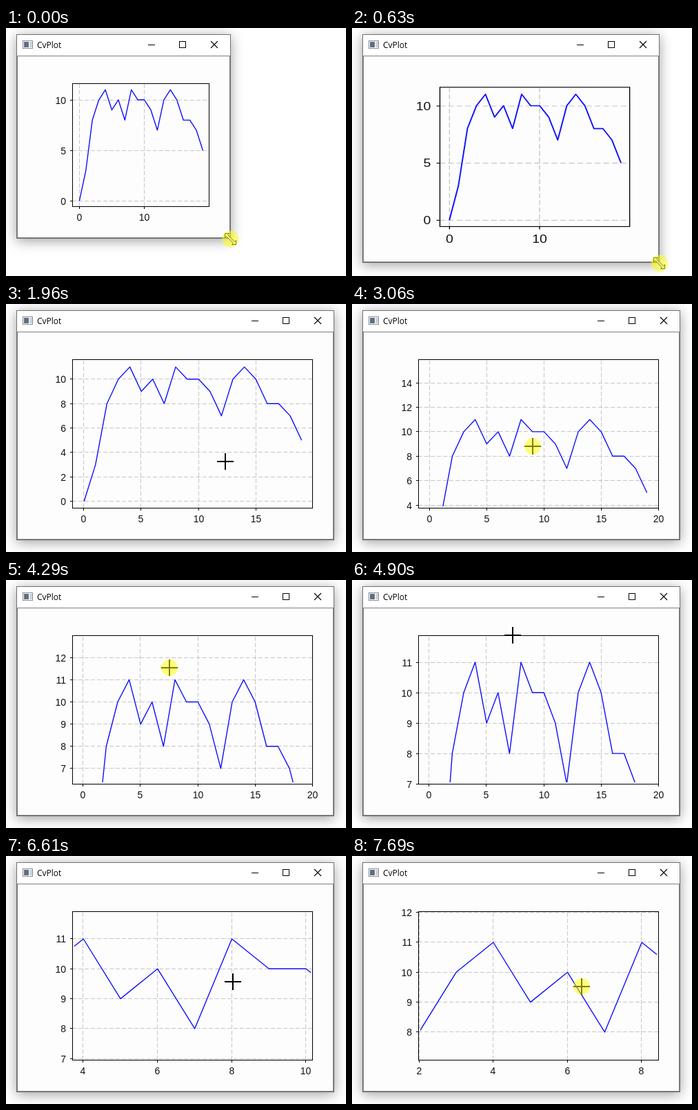
Write an HTML page with a canvas that moves like this. It is 493 by 359 pixels and loops after 7.86 s.

```html
<!DOCTYPE html>
<html>
<head>
<meta charset="utf-8">
<title>CvPlot</title>
<style>
html, body { margin: 0; overflow: hidden; background: #fff; }
canvas { display: block; }
</style>
</head>
<body>
<canvas id="stage" width="493" height="359"></canvas>
<script>
const ctx = document.getElementById('stage').getContext('2d');
const LOOP = 7860, STEP = 77.65;   // the screen is sampled every STEP ms
const REPLOT = 1390, ENTER = 1550; // resize button released, pointer enters the plot
const RELEASE = 110;               // the button stays down this long after a drag
const ZOOM = 0.00696;
const START = { x: 325, y: 304 }, FULL = { x: 475, y: 341 };
const DATA = [0, 3, 8, 10, 11, 9, 10, 8, 11, 10, 10, 9, 7, 10, 11, 10, 8, 8, 7, 5];

const linear = p => p;
const smooth = p => p * p * (3 - 2 * p);
const easeOut = p => 1 - (1 - p) ** 2;

function pan(view, from, dx, dy) {
  view.x0 += dx;
  view.y0 += dy;
}

function zoom(view, from, dx, dy) {
  const fx = Math.exp(ZOOM * dx), fy = Math.exp(-ZOOM * dy);
  view.x0 = from.x + (view.x0 - from.x) * fx;
  view.y0 = from.y + (view.y0 - from.y) * fy;
  view.sx *= fx;
  view.sy *= fy;
}

// pointer moves: begin ms, end ms, x, y, easing, drag action
const MOVES = [
  [155, 621, 445, 339, linear],
  [621, 931, 475, 341, easeOut],
  [1475, 1941, 319, 229, linear],
  [1941, 2400, 263, 130, smooth],
  [2560, 3236, 262, 214, easeOut, pan],
  [3300, 3415, 237, 212.8, smooth],
  [3727, 4626, 237, 81.8, smooth, zoom],
  [4650, 4815, 235, 74, easeOut],
  [4815, 5340, 208, 179, smooth],
  [5436, 6368, 377, 181.3, linear, zoom],
  [6446, 6833, 241, 184, smooth],
  [6988, 7687, 333.7, 189, smooth, pan]
];

function stateAt(t) {
  const cursor = { ...START }, view = fitView(FULL);
  let pressed = t < REPLOT;
  for (const [begin, end, x, y, ease, drag] of MOVES) {
    if (t < begin) break;
    const p = ease(Math.min(1, (t - begin) / (end - begin)));
    const dx = (x - cursor.x) * p, dy = (y - cursor.y) * p;
    if (drag) {
      drag(view, cursor, dx, dy);
      pressed ||= t < end + RELEASE;
    }
    cursor.x += dx;
    cursor.y += dy;
  }
  cursor.x = Math.floor(cursor.x);
  cursor.y = Math.floor(cursor.y);
  return { cursor, view, pressed };
}

// the data range plus a 5% margin on every side
function fitView(size) {
  const box = { l: 96, t: 80, r: size.x - 31, b: size.y - 46 };
  const sx = (box.r - box.l - 1) / 20.9, sy = (box.b - box.t - 1) / 12.1;
  return { box, sx, sy, x0: box.l + 1.2 + sx * 0.95, y0: box.b + 0.4 - sy * 0.55 };
}

function line(color, width, ...points) {
  ctx.beginPath();
  points.forEach(([x, y]) => ctx.lineTo(x, y));
  ctx.strokeStyle = color;
  ctx.lineWidth = width;
  ctx.stroke();
}

function ticks(scale, minGap, toPixel, lo, hi) {
  const step = [1, 2, 5, 10, 20].find(s => s * scale >= minGap);
  const list = [];
  for (let v = -20; v <= 40; v += step) {
    const p = toPixel(v);
    if (p > lo + 0.6 && p < hi + 0.5) list.push([v, Math.floor(p) + 0.5]);
  }
  return list;
}

function drawPlot({ box, sx, sy, x0, y0 }) {
  const { l, t, r, b } = box;
  const px = v => x0 + sx * v, py = v => y0 - sy * v;
  const xs = ticks(sx, 60, px, l, r), ys = ticks(sy, 30, py, t, b);

  ctx.setLineDash([6, 3]);
  xs.forEach(([, x]) => line('#c6c6c6', 1, [x, b], [x, t]));
  ys.forEach(([, y]) => line('#c6c6c6', 1, [l, y], [r, y]));
  ctx.setLineDash([]);

  ctx.save();
  ctx.beginPath();
  ctx.rect(l + 3, t + 2, r - l - 5, b - t - 4);
  ctx.clip();
  ctx.lineJoin = 'round';
  line('#0f0fff', 1.4, ...DATA.map((v, i) => [px(i) + 0.2, py(v)]));
  ctx.restore();

  ctx.strokeStyle = '#000';
  ctx.lineWidth = 1;
  ctx.strokeRect(l + 0.5, t + 0.5, r - l, b - t);
  ctx.fillStyle = '#111';
  ctx.font = '14px "Liberation Sans", Arial, sans-serif';
  ctx.textAlign = 'center';
  for (const [v, x] of xs) {
    line('#000', 1, [x, b], [x, b + 4]);
    ctx.fillText(v, x, b + 21);
  }
  ctx.textAlign = 'right';
  for (const [v, y] of ys) {
    line('#000', 1, [l - 3, y], [l, y]);
    ctx.fillText(v, l - 9, y + 5);
  }
}

function drawWindow({ x: r, y: b }) {
  ctx.save();
  ctx.shadowColor = 'rgba(0,0,0,.38)';
  ctx.shadowBlur = 17;
  ctx.shadowOffsetY = 3;
  ctx.fillStyle = '#fff';
  ctx.fillRect(15, 9, r - 14, b - 8);
  ctx.restore();
  ctx.fillStyle = '#fdfdfd';
  ctx.fillRect(16, 41, r - 16, b - 41);
  ctx.strokeStyle = '#707070';
  ctx.lineWidth = 1;
  ctx.strokeRect(15.5, 9.5, r - 15, b - 9);
  ctx.strokeStyle = '#808080';
  ctx.strokeRect(16.5, 40.5, r - 17, b - 41);

  ctx.strokeStyle = '#8c8c8c';
  ctx.strokeRect(24.5, 18.5, 14, 11);
  ctx.fillStyle = '#5d6f86';
  ctx.fillRect(26, 20, 7, 8);
  ctx.fillStyle = '#cfd4da';
  ctx.fillRect(34, 20, 4, 8);

  ctx.fillStyle = '#000';
  ctx.font = '12px "Open Sans", sans-serif';
  ctx.textAlign = 'left';
  ctx.fillText('CvPlot', 45, 29);

  line('#000', 1, [r - 119, 24.5], [r - 109, 24.5]);
  ctx.strokeRect(r - 73.5, 19.5, 9, 9);
  line('#000', 1.1, [r - 28, 19], [r - 18, 29]);
  line('#000', 1.1, [r - 28, 29], [r - 18, 19]);
}

function drawCursor({ x, y }, resizing, pressed) {
  ctx.save();
  ctx.translate(x, y);
  if (resizing) {
    // double arrow: half of it, then the same half turned around
    const half = [[-8, -8], [-2, -8], [-4, -6], [6, 4], [8, 2]];
    ctx.translate(0.5, 1.5);
    ctx.beginPath();
    for (const sign of [1, -1]) half.forEach(([u, v]) => ctx.lineTo(sign * u, sign * v));
    ctx.closePath();
    ctx.fillStyle = '#fff';
    ctx.fill();
    ctx.strokeStyle = '#000';
    ctx.lineWidth = 1;
    ctx.stroke();
  } else {
    line('#000', 2, [-12, 0], [12, 0]);
    line('#000', 2, [0, -12], [0, 12]);
  }
  if (pressed) {
    ctx.beginPath();
    ctx.arc(0, 0, 12, 0, Math.PI * 2);
    ctx.fillStyle = 'rgba(255,255,0,.5)';
    ctx.fill();
  }
  ctx.restore();
}

function draw(now) {
  const t = STEP * Math.min(99, Math.floor((now % LOOP) / STEP + 0.04));
  const { cursor, view, pressed } = stateAt(t);
  const corner = t < ENTER ? cursor : FULL;
  ctx.fillStyle = '#fff';
  ctx.fillRect(0, 0, 493, 359);
  drawWindow(corner);

  if (t < REPLOT) {
    // the old picture is stretched until the button is released
    ctx.save();
    ctx.translate(17, 41);
    ctx.scale((corner.x - 17) / (START.x - 17), (corner.y - 41) / (START.y - 41));
    ctx.translate(-17, -41);
    drawPlot(fitView(START));
    ctx.restore();
  } else {
    drawPlot(view);
  }
  drawCursor(cursor, t < ENTER, pressed);
}

const begin = performance.now();
(function frame() {
  draw(performance.now() - begin);
  requestAnimationFrame(frame);
})();
</script>
</body>
</html>
```
